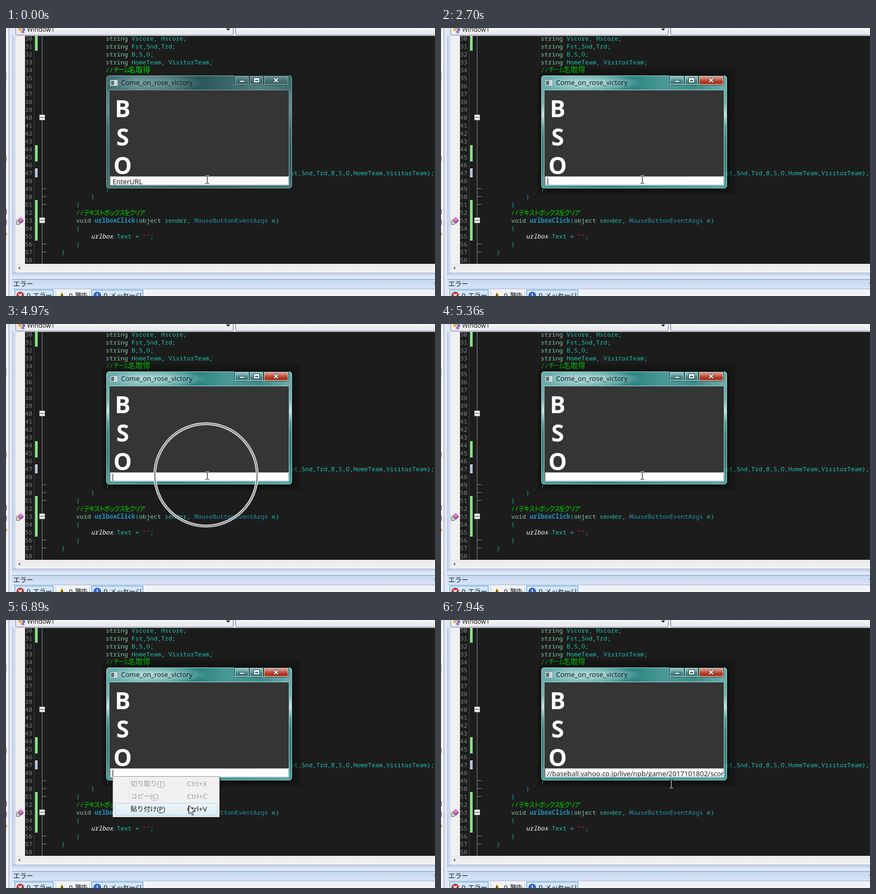
These frames come from a looping animation (813x508 px, 8 s). An HTML page with a canvas:

```html
<!DOCTYPE html>
<html lang="ja">
<head>
<meta charset="utf-8">
<title>Editor and score window</title>
<style>
html, body { margin: 0; width: 100%; height: 100%; overflow: hidden; background: #1c1c1c; }
canvas { display: block; }
</style>
</head>
<body>
<canvas id="stage" width="813" height="508"></canvas>
<script>
const stage = document.getElementById('stage').getContext('2d');
const layer = new OffscreenCanvas(813, 508).getContext('2d');
let ctx = stage;
const LOOP = 8000;
const MONO = '11.667px "Noto Sans Mono", monospace';
const UI = '"Open Sans", "Noto Sans", sans-serif';
const CJK = '"Noto Sans CJK JP", "Noto Sans CJK", sans-serif';
const TEAL = '#1fc2ae', KEY = '#86c9a4', TYPE = '#1f93ad', NOTE = '#00dc00', BRACE = '#12a59c';

function box(x, y, w, h, color) {
  ctx.fillStyle = color;
  ctx.fillRect(x, y, w, h);
}

function frame(x, y, w, h, color, r = 0) {
  ctx.strokeStyle = color;
  ctx.lineWidth = 1;
  ctx.beginPath();
  ctx.roundRect(x + .5, y + .5, w - 1, h - 1, r);
  ctx.stroke();
}

function text(s, x, y, font, color, spacing = 0) {
  ctx.font = font;
  ctx.letterSpacing = spacing + 'px';
  ctx.fillStyle = color;
  ctx.fillText(s, x, y);
  const w = ctx.measureText(s).width;
  ctx.letterSpacing = '0px';
  return x + w;
}

function shape(points, color) {
  ctx.fillStyle = color;
  ctx.beginPath();
  points.forEach(([x, y]) => ctx.lineTo(x, y));
  ctx.closePath();
  ctx.fill();
}

function disc(x, y, r, color) {
  ctx.fillStyle = color;
  ctx.beginPath();
  ctx.arc(x, y, r, 0, 7);
  ctx.fill();
}

function ramp(x0, y0, x1, y1, colors) {
  const g = ctx.createLinearGradient(x0, y0, x1, y1);
  colors.forEach((c, i) => g.addColorStop(i / (colors.length - 1), c));
  return g;
}

const baseline = line => 24 + 15 * (line - 30);

// each part: [text, color, optional style]
function code(line, x, ...parts) {
  for (const [s, color, style = ''] of parts) {
    x = text(s, x, baseline(line), style + ' ' + MONO, color);
  }
}

function drawCode() {
  for (let n = 30; n <= 58; n++) text(n, 36, baseline(n), MONO, '#7c8484');
  for (let y = 14; y < 447; y += 2) box(53, y, 1, 1, '#5c5c5c');

  const green = '#86e486';
  box(55, 14, 5, 29, green);
  box(55, 222, 5, 31, green);
  box(55, 326, 5, 77, green);
  box(55, 266, 5, 17, '#b4c6e4');

  box(68, 14, 1, 433, '#8a8a8a');
  for (let n = 49; n <= 57; n++) {
    if (n < 52 || n > 55) box(68, baseline(n) - 5, 9, 1, '#8a8a8a');
  }
  for (const y of [169, 364]) {
    box(63, y - 5, 11, 11, '#f4f4f4');
    frame(63, y - 5, 11, 11, '#8a8a8a');
    box(65, y, 7, 1, '#202020');
  }

  const decls = ['Vscore, Hscore;', 'Fst,Snd,Trd;', 'B,S,O;', 'HomeTeam, VisitorTeam;'];
  decls.forEach((d, i) => code(30 + i, 189, ['string ', KEY], [d, TEAL]));
  code(34, 189, ['//', NOTE]);
  const kanji = text('チーム', 203, 84, '12px ' + CJK, NOTE, -2.3);
  text('名取得', kanji, 84, '13.7px ' + CJK, NOTE);
  code(47, 532, ['Fst,Snd,Trd,B,S,O,HomeTeam,VisitorTeam};', TEAL]);
  code(49, 189, ['}', BRACE]);
  code(50, 161, ['}', BRACE]);
  code(51, 133, ['}', BRACE]);
  code(52, 133, ['//', NOTE]);
  text('テキストボックスをクリア', 147, baseline(52) + .5, '12px ' + CJK, NOTE, -2.4);
  code(53, 133, ['void ', KEY], ['urlboxClick', '#2196c4', 'bold'], ['(', TEAL], ['object ', KEY],
    ['sender, ', TEAL], ['MouseButtonEventArgs', TYPE], [' e)', TEAL]);
  code(54, 133, ['{', BRACE]);
  code(55, 161, ['urlbox', '#ffffff', 'italic 500'], ['.Text = ', TEAL], ['""', '#e01818'], [';', TEAL]);
  code(56, 133, ['}', BRACE]);
  code(57, 105, ['}', BRACE]);
}

function drawTopBar() {
  box(12, 0, 801, 15, '#dfe5f2');
  for (const [x, w] of [[18, 413], [435, 390]]) {
    box(x, -8, w, 22, ramp(0, 0, 0, 14, ['#f5f5f6', '#e3e5ea']));
    frame(x, -8, w, 22, '#80889a', 2);
  }
  shape([[417, 1], [425, 1], [421, 5]], '#202020');
  shape([[22, 2], [27, -2], [31, 3], [26, 6]], '#e8b33c');
  shape([[30, 1], [35, 0], [37, 5], [32, 6]], '#5b78c8');
  shape([[28, 6], [33, 5], [35, 9], [30, 10]], '#b35ab8');
  text('Window1', 40, 7, '12px ' + UI, '#101010');
}

function drawLeftStrip() {
  box(0, 0, 5, 508, '#f3f3f5');
  box(5, 0, 1, 508, '#8e9dbd');
  box(6, 0, 6, 508, '#dfe8f8');
  box(12, 0, 1, 508, '#a9b8d8');
  box(13, 0, 5, 465, '#cfdaf0');
  box(18, 14, 18, 433, '#f0f0f0');
  box(0, 85, 1, 15, '#a0a8b8');
  box(0, 243, 1, 9, '#9a6a20');
  box(0, 343, 1, 10, '#7a1e88');
  box(0, 363, 1, 10, '#7a1e88');
  box(0, 388, 2, 5, '#e0a838');

  shape([[23, 363], [28, 358], [33, 363], [28, 368]], '#dc78c8');
  shape([[23, 363], [28, 368], [28, 371], [23, 366]], '#a03a96');
  shape([[28, 368], [33, 363], [33, 366], [28, 371]], '#8c2484');
  frame(20, 362, 5, 6, '#707070', 2);
  box(19, 366, 7, 7, '#d0d3d8');
  frame(19, 366, 7, 7, '#707070');
}

function drawBottom() {
  box(18, 447, 795, 17, ramp(0, 447, 0, 464, ['#e9e9ec', '#f3f3f4']));
  shape([[23, 455], [27, 452], [27, 458]], '#70747c');
  box(13, 464, 800, 6, '#cfdaf0');
  box(13, 464, 800, 1, '#8fa2c6');
  box(6, 470, 807, 6, '#dfe8f8');
  box(12, 476, 801, 19, ramp(0, 476, 0, 495, ['#c7d8f0', '#d9e5f7']));
  box(12, 476, 801, 1, '#8799bd');
  text('エラー', 14, 490, '12.5px ' + CJK, '#101828');
  shape([[811, 483], [819, 483], [815, 487]], '#303848');
  box(12, 495, 801, 13, '#f2f3f6');
  box(12, 494, 801, 1, '#a3b3d0');

  for (const [x, w] of [[16, 74], [162, 98]]) {
    box(x, 496, w, 16, '#d3e5f8');
    frame(x, 496, w, 16, '#3995e4');
  }
  for (const x of [94, 158]) box(x, 498, 1, 10, '#b8bdc8');
  disc(27, 507, 7, '#8c1c1c');
  disc(27, 507, 6, '#d23a38');
  ctx.strokeStyle = '#fff';
  ctx.lineWidth = 2;
  ctx.beginPath();
  ctx.moveTo(24, 504); ctx.lineTo(30, 510);
  ctx.moveTo(30, 504); ctx.lineTo(24, 510);
  ctx.stroke();
  shape([[106, 500], [113, 514], [99, 514]], '#e8b820');
  box(105, 504, 2, 6, '#302000');
  disc(173, 507, 7, '#1c3d92');
  disc(173, 507, 6, '#3569cc');
  box(172, 503, 2, 2, '#fff');
  box(172, 506, 2, 5, '#fff');
  const label = (s, x, gap) => {
    text('0', x, 512, '13px ' + UI, '#101010');
    text(s, x + 12, 512, '12.5px ' + CJK, '#101010', gap);
  };
  label('エラー', 39, -.5);
  label('警告', 119, -1);
  label('メッセージ', 185, -.5);
}

function drawGlass(active) {
  const edge = new Path2D();
  edge.roundRect(190, 90, 352, 214, 6);
  if (active) box(184, 77, 374, 238, 'rgba(0,0,0,.2)');
  ctx.save();
  ctx.shadowColor = `rgba(0,0,0,${active ? .7 : .3})`;
  ctx.shadowBlur = active ? 12 : 5;
  ctx.shadowOffsetY = 2;
  ctx.fillStyle = '#2f7876';
  ctx.fill(edge);
  ctx.restore();

  ctx.save();
  ctx.clip(edge);
  box(190, 90, 352, 28, active
    ? ramp(190, 90, 542, 110, ['#63abaa', '#79b7b6', '#5aa5a3', '#2c8482', '#4c9a98', '#3d8d8b', '#6db0ae'])
    : ramp(190, 90, 542, 110, ['#3f6b6e', '#5c8688', '#477477', '#285557', '#3d696b', '#547f81', '#3d6b6d']));
  const sides = active
    ? ['#62a8a6', '#6db0ae', '#c4e4e2', '#4d9c99', '#2f8481', '#2c7d7a', '#2c7d7a', '#3a918d', '#47a09c']
    : ['#4a7a7c', '#5f8c8d', '#39696b', '#325f61', '#355f62', '#447476'];
  for (const x of [190, 536]) box(x, 118, 6, 186, ramp(0, 118, 0, 304, sides));
  box(196, 298, 340, 6, active
    ? ramp(196, 0, 536, 0, ['#3f9a96', '#2d817e', '#3b9591', '#4da39f'])
    : ramp(196, 0, 536, 0, ['#3f6e70', '#335e60', '#416f71']));

  // soft halo behind the title
  ctx.save();
  ctx.translate(285, 104);
  ctx.scale(1, .15);
  const halo = ctx.createRadialGradient(0, 0, 30, 0, 0, 98);
  halo.addColorStop(0, `rgba(225,245,245,${active ? .5 : .2})`);
  halo.addColorStop(1, 'rgba(225,245,245,0)');
  box(-98, -98, 196, 196, halo);
  ctx.restore();
  ctx.restore();
  frame(190, 90, 352, 214, active ? '#a9dad7' : '#8ab2b3', 5);
}

function drawButtons(active) {
  const plain = active
    ? ['#9cc8c7', '#6aa5a4', '#347a79', '#5ba09e']
    : ['#6b9495', '#527d7f', '#3b686a', '#4b7779'];
  const red = ['#e0a596', '#cc6c58', '#a92a17', '#cc6540'];
  const rim = active ? '#c2e4e2' : '#8fb5b5';
  for (const [x, w, colors] of [[433, 28, plain], [461, 27, plain], [488, 48, active ? red : plain]]) {
    box(x, 91, w, 18, ramp(0, 91, 0, 109, colors));
    frame(x, 90, w, 19, '#1c3c3c', [0, 0, 3, 3]);
    frame(x + 1, 91, w - 2, 17, rim);
  }
  box(442, 99, 11, 4, '#34484a');
  box(443, 100, 9, 2, '#fff');
  box(469, 94, 12, 10, '#34484a');
  box(470, 95, 10, 8, '#fff');
  box(472, 98, 6, 3, '#4e7778');
  for (const [color, width] of [['#3c4648', 4], ['#fff', 2]]) {
    ctx.strokeStyle = color;
    ctx.lineWidth = width;
    ctx.beginPath();
    ctx.moveTo(508.5, 95.5); ctx.lineTo(515.5, 102.5);
    ctx.moveTo(515.5, 95.5); ctx.lineTo(508.5, 102.5);
    ctx.stroke();
  }
}

function drawWindow(t) {
  const active = t >= 1470;
  drawGlass(active);
  drawButtons(active);
  box(197, 98, 15, 12, '#f3f7f7');
  frame(197, 98, 15, 12, '#789294');
  box(199, 100, 6, 8, '#4d7470');
  box(206, 100, 4, 8, '#c6d2d4');
  text('Come_on_rose_victory', 218, 108, '13px ' + UI, '#081414');

  box(196, 118, 340, 180, '#353535');
  frame(195, 117, 342, 182, active ? '#a9d6d4' : '#86aaab', 1);
  ctx.textAlign = 'center';
  ['B', 'S', 'O'].forEach((s, i) => text(s, 221, 169 + 54 * i, 'bold 44px ' + UI, '#fff'));
  ctx.textAlign = 'left';
  box(197, 281, 339, 17, active ? '#fff' : '#f8f8f8');
  frame(197, 281, 339, 17, '#a5adb5');

  ctx.save();
  ctx.beginPath();
  ctx.rect(198, 281, 337, 16);
  ctx.clip();
  if (t < 1880) text('EnterURL', 202, 296, '13px ' + UI, '#101010');
  if (t >= 7280) text('//baseball.yahoo.co.jp/live/npb/game/2017101802/score', 201, 296, '13px ' + UI, '#101010');
  ctx.restore();

  const blinks = [1880, 2300, 2700, 3250, 3810, 4390, 4820, 5360, 5830].filter(b => t >= b).length;
  if (t < 7280 && blinks % 2) box(202, 284, 1, 13, '#000');
}

function drawMenu(t) {
  box(202, 296, 203, 78, '#f1f1f1');
  frame(202, 296, 203, 78, '#979797');
  box(233, 298, 1, 74, '#e4e5e6');
  if (t >= 6890) {
    ctx.fillStyle = ramp(0, 347, 0, 371, ['#eff5fa', '#dcecf6']);
    ctx.beginPath();
    ctx.roundRect(206, 347, 195, 24, 3);
    ctx.fill();
    frame(206, 347, 195, 24, '#a9d6ee', 3);
  }
  const rows = [['切り取り', 'T', 'X'], ['コピー', 'C', 'C'], ['貼り付け', 'P', 'V']];
  rows.forEach(([name, mark, key], i) => {
    const y = 315 + 24 * i, color = i < 2 ? '#9a9a9a' : '#101010', font = '13px ' + UI;
    let x = text(name, 236, y, '12.5px ' + CJK, color);
    x = text('(', x, y, font, color);
    const end = text(mark, x, y, font, color);
    box(x, y + 2, end - x, 1, color);
    text(')', end, y, font, color);
    text('Ctrl+' + key, 343, y, '13.5px ' + UI, color);
  });
}

// the menu fades as one piece, so it is painted on its own layer first
function showMenu(t) {
  if (t < 6290 || t >= 7430) return;
  const solid = t >= 6440 && t < 7280;
  ctx = layer;
  ctx.clearRect(0, 0, 813, 508);
  drawMenu(t);
  ctx = stage;
  if (solid) box(204, 298, 203, 78, 'rgba(0,0,0,.35)');
  ctx.globalAlpha = solid ? 1 : .55;
  ctx.drawImage(layer.canvas, 0, 0);
  ctx.globalAlpha = 1;
}

function drawRing(t) {
  if (t < 4970 || t >= 5360) return;
  const step = Math.min(2, Math.floor((t - 4970) / 120));
  for (const [color, width] of [['#fff', 5], ['#858585', 2.6]]) {
    ctx.strokeStyle = color;
    ctx.lineWidth = width;
    ctx.beginPath();
    ctx.arc(379, 286, 97 - 40 * step, 0, 7);
    ctx.stroke();
  }
}

function beam(x, y) {
  ctx.globalCompositeOperation = 'difference';
  box(x, y - 7, 1, 14, '#fff');
  for (const end of [y - 8, y + 7]) {
    box(x - 3, end, 3, 1, '#fff');
    box(x + 1, end, 3, 1, '#fff');
  }
  ctx.globalCompositeOperation = 'source-over';
}

function arrow(x, y) {
  const tip = [[0, 0], [0, 16], [3.7, 12.5], [6.5, 18.5], [9, 17.4], [6.3, 11.6], [11.3, 11.6]]
    .map(([dx, dy]) => [x + dx + .5, y + dy + .5]);
  shape(tip, '#fff');
  ctx.strokeStyle = '#000';
  ctx.lineWidth = 1;
  ctx.stroke();
}

const stops = [
  [0, beam, 381, 287], [6290, arrow, 379, 286], [6600, arrow, 376, 295], [6740, arrow, 350, 333],
  [6890, arrow, 346, 351], [7430, beam, 356, 352], [7550, beam, 386, 338], [7670, beam, 416, 321],
  [7790, beam, 432, 311], [7940, beam, 436, 311]
];

function draw() {
  const t = performance.now() % LOOP;
  box(0, 0, 813, 508, '#1c1c1c');
  drawLeftStrip();
  drawCode();
  drawTopBar();
  drawBottom();
  drawWindow(t);
  showMenu(t);
  drawRing(t);
  const [, pointer, x, y] = stops.findLast(s => t >= s[0]);
  pointer(x, y);
  requestAnimationFrame(draw);
}
draw();
</script>
</body>
</html>
```
